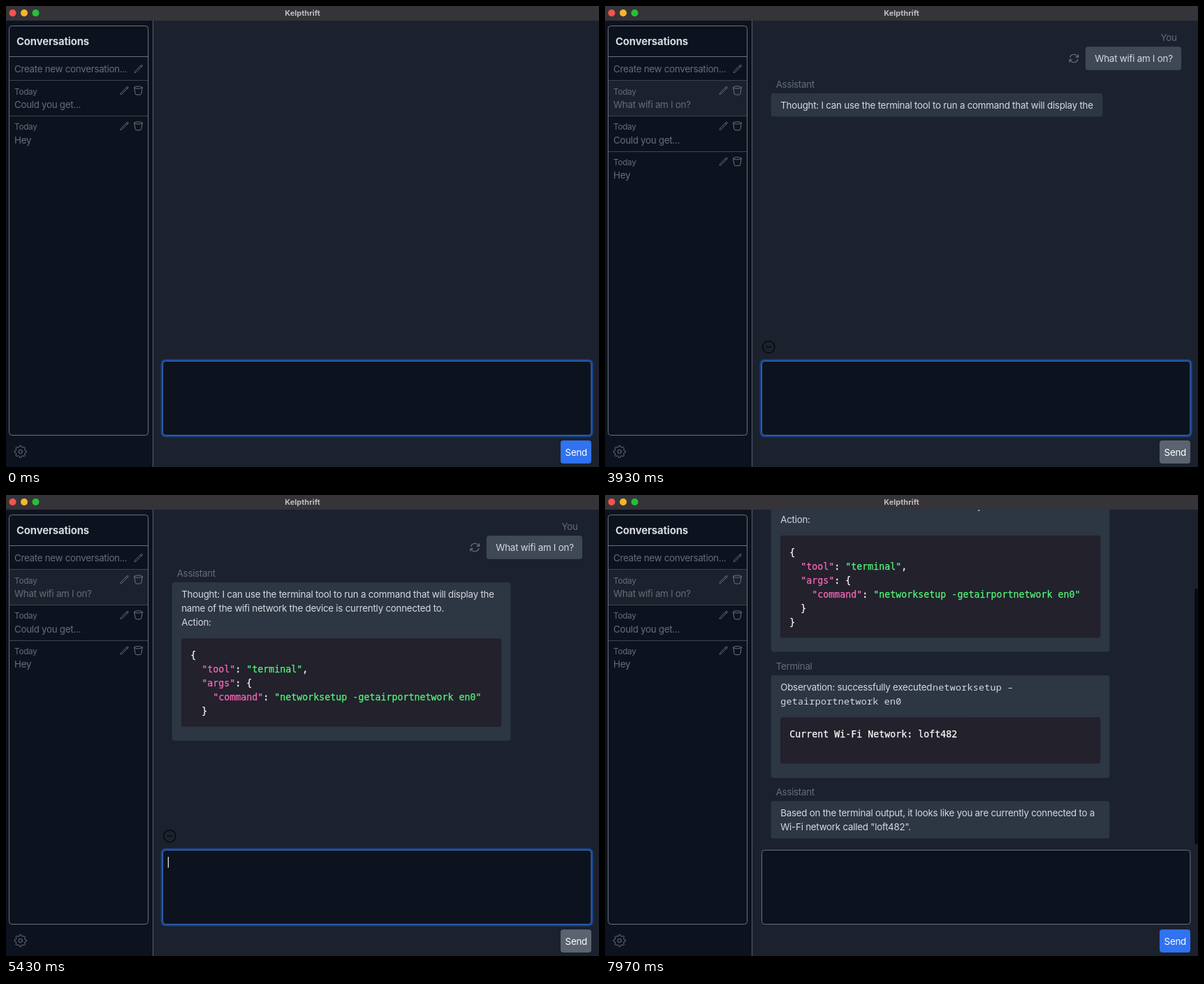
These frames come from a looping animation (849x660 px, 8 s). An HTML page:

```html
<!DOCTYPE html>
<html lang="en">
<head>
<meta charset="utf-8">
<title>Chat</title>
<style>
html, body { margin: 0; width: 100%; height: 100%; overflow: hidden; background: #1b222e; }
svg { display: block; width: 100vw; height: 100vh; }
text { font: 13.36px Inter, sans-serif; letter-spacing: -.245px; fill: #d5d9df; white-space: pre; }
.dim { fill: #666d79; letter-spacing: -.29px; }
.small { font-size: 11.7px; letter-spacing: -.25px; }
.head { font-size: 14.8px; font-weight: 700; letter-spacing: -.1px; }
.title { font-size: 11px; font-weight: 700; letter-spacing: 0; fill: #bebdc1; text-anchor: middle; }
.white { fill: #fff; }
.code { font-family: "DejaVu Sans Mono", monospace; font-size: 13.3px; letter-spacing: 0; fill: #f8f8f5; stroke: #f8f8f5; stroke-width: .25; }
.key { fill: #f766b9; stroke: #f766b9; }
.str { fill: #52f578; stroke: #52f578; }
.inline { font-family: "Noto Sans Mono", monospace; letter-spacing: .24px; }
.icon { fill: none; stroke: #6f7681; stroke-width: 1.6; stroke-linecap: round; stroke-linejoin: round; }
.thin { stroke-width: 1; }
</style>
</head>
<body>
<svg viewBox="0 0 849 660">
  <defs>
    <clipPath id="view"><rect x="211" y="21" width="638" height="479"/></clipPath>
    <g id="pencil" class="icon" transform="scale(.57) translate(-11.7 -12)">
      <path d="M16.86 4.49l1.69-1.69a1.875 1.875 0 1 1 2.65 2.65L6.83 19.82a4.5 4.5 0 0 1-1.9 1.13l-2.68.8.8-2.69a4.5 4.5 0 0 1 1.13-1.9zM16.86 4.49L19.5 7.12"/>
    </g>
    <g id="bin" class="icon thin">
      <ellipse cy="-4.4" rx="5.8" ry="1.6"/>
      <path d="M-5.8-4.4l1.3 8.2q.3 2.3 2.6 2.3h3.8q2.3 0 2.6-2.3l1.3-8.2"/>
    </g>
    <g id="reload" class="icon" transform="scale(.7) translate(-12 -12)">
      <path d="M16.02 9.35h5M2.98 19.64v-5h5M2.98 14.65l3.18 3.18a8.25 8.25 0 0 0 13.8-3.7M4.03 9.87a8.25 8.25 0 0 1 13.8-3.7l3.18 3.18v-5"/>
    </g>
    <path id="hand" fill="#fff" stroke="#111" stroke-width=".9" d="M-1.2 1a1.2 1.2 0 0 1 2.4 0v3.6l4.2.9q1.4.4 1.2 2l-.8 3.6q-.2 1.4-1.5 1.4h-4q-1 0-1.6-.9l-3-4.2q-.7-1 .1-1.6t1.9.3l1.1 1z"/>
    <path id="arrow" fill="#000" stroke="#fff" stroke-width=".8" d="M0 0v11l2.6-2.4 1.7 3.9 1.9-.8-1.7-3.8h3.6z"/>
  </defs>

  <rect width="849" height="660" fill="#1b222e"/>
  <rect y="21" width="210" height="639" fill="#0d131e"/>
  <path d="M210.5 21v639" stroke="#59606b"/>
  <g id="chat" clip-path="url(#view)"></g>
  <rect width="849" height="21" fill="#353439"/>
  <circle cx="9.5" cy="10" r="5" fill="#f3544d"/>
  <circle cx="26" cy="10" r="5" fill="#f5b62f"/>
  <circle cx="42.5" cy="10" r="5" fill="#25c03a"/>
  <text class="title" x="424.5" y="13.5">Kelpthrift</text>

  <g id="list"></g>
  <rect x="4.5" y="28.5" width="199" height="586" rx="4" fill="none" stroke="#69707c"/>
  <path d="M5 72.5h198" stroke="#69707c"/>
  <path d="M5 106.5h198" stroke="#3d4450"/>
  <text class="head" x="15" y="55.7">Conversations</text>
  <text class="dim" x="12" y="95.2">Create new conversation...</text>
  <use href="#pencil" transform="translate(189.5 90)"/>
  <g class="icon thin" transform="translate(20.7 638)"><path id="gear"/><circle r="2.7"/></g>

  <g id="form"></g>
</svg>
<script>
const LOOP = 8000, SEND = 3190, CLICK = 6880, BOTTOM = 491.7, LINE = 20.04, PITCH = 8.007;
const TRACK = -.245;                   // letter spacing of plain text
const QUESTION = 'What wifi am I on?';
const $ = id => document.getElementById(id);
const clamp = v => Math.max(0, Math.min(1, v));
const part = (t, a, b) => clamp((t - a) / (b - a));

const text = (x, y, s, cls = '') => `<text x="${x}" y="${y}" class="${cls}">${s}</text>`;
const box = (x, y, w, h, fill, r = 3.5, more = '') =>
  `<rect x="${x}" y="${y}" width="${w}" height="${h}" rx="${r}" fill="${fill}" ${more}/>`;
const icon = (id, x, y) => `<g transform="translate(${x} ${y})"><use href="#${id}"/></g>`;
const bubble = (y, w, h) => box(237.7, y, w, h, '#2d3643');
const codeBox = (y, lines) => box(251, y, 458.3, 26.3 + lines * LINE, '#22212c');

const pen = document.createElement('canvas').getContext('2d');
function width(s) {
  pen.font = '13.36px Inter, sans-serif';
  return pen.measureText(s).width + TRACK * s.length;
}

// Shows whole words of s between two times.
function words(s, t, a, b) {
  const all = s.match(/\s*\S+/g);
  return t < a ? '' : all.slice(0, 1 + Math.floor(part(t, a, b) * (all.length - 1))).join('');
}

const thought = [
  ['Thought: I can use the terminal tool to run a command that will display the', 3490, 3900],
  ['name of the wifi network the device is currently connected to.', 3950, 4420],
  ['Action:', 4450, 4480]
];
const reply = [
  ['Based on the terminal output, it looks like you are currently connected to a', 7260, 7665],
  ['Wi-Fi network called "loft482".', 7700, 7880]
];
// Each line: indent, start, end, then class and text pairs.
const json = [
  [0, 4560, 4570, '', '{'],
  [2, 4640, 4830, 'key', '"tool"', '', ': ', 'str', '"terminal"', '', ','],
  [2, 4840, 4905, 'key', '"args"', '', ': {'],
  [4, 4910, 4960, 'key', '"command"', '', ':'],
  [4, 4990, 5380, 'str', '"networksetup -getairportnetwork en0"'],
  [2, 5420, 5430, '', '}'],
  [0, 5470, 5480, '', '}']
];

function codeLines(t, top) {
  let out = '', row = -1;
  json.forEach(([indent, a, b, ...runs], i) => {
    if (t < a) return;
    const more = i === 4;              // continues the line above
    if (!more) row++;
    const all = runs.filter((_, k) => k % 2).join('').length;
    let left = Math.ceil(part(t, a, b) * (all - 1)) + 1, spans = '';
    for (let k = 0; k < runs.length; k += 2) {
      const s = runs[k + 1].slice(0, Math.max(0, left));
      left -= runs[k + 1].length;
      spans += `<tspan class="${runs[k]}">${s}</tspan>`;
    }
    const col = indent + (more ? 11 : 0);
    out += text(264.2 + col * PITCH, top + 28.5 + row * LINE, spans, 'code');
  });
  return { out, rows: row + 1 };
}

// Streams lines of prose into a bubble that grows with them.
function prose(lines, t, top) {
  const shown = lines.map(l => words(l[0], t, l[1], l[2])).filter(Boolean);
  return {
    out: shown.map((s, i) => text(251.2, top + 22 + i * LINE, s)).join(''),
    w: shown.length > 1 ? 484.7 : Math.min(484.7, width(shown[0]) + 27.2),
    h: 13.3 + shown.length * LINE
  };
}

function chat(t) {
  if (t < SEND) return '';
  let out = text(795.5, 50, 'You', 'dim') + box(688, 58.3, 137, 33.4, '#3f4855')
    + text(701.3, 80.2, QUESTION) + icon('reload', 671.3, 75);
  let end = 0;
  if (t >= 3490) {
    const p = prose(thought, t, 125), top = 205.2, c = codeLines(t, top);
    const h = c.rows ? top - 125 + 26.3 + c.rows * LINE + 20 : p.h;
    out += text(244.7, 117, 'Assistant', 'dim') + bubble(125, p.w, h) + p.out
      + (c.rows ? codeBox(top, c.rows) + c.out : '');
    end = 125 + h;
  }
  if (t >= 6980) {
    out += text(244.7, 397.2, 'Terminal', 'dim') + bubble(405.5, 484.7, 146.6)
      + text(251.2, 427.4, 'Observation: successfully executed')
      + text(468.9, 427.4, 'networksetup –', 'inline')
      + text(251.2, 447.5, 'getairportnetwork en0', 'inline')
      + codeBox(465.4, 2) + text(264.2, 493.9, 'Current Wi-Fi Network: loft482', 'code');
    end = 552.1;
  }
  if (t >= 7260) {
    const p = prose(reply, t, 585.5);
    out += text(244.7, 577.3, 'Assistant', 'dim') + bubble(585.5, p.w, p.h) + p.out;
    end = 585.5 + p.h;
  }
  const scroll = Math.max(0, end - BOTTOM), bar = 479 * 479 / (479 + scroll);
  return `<g transform="translate(0 ${-scroll})">${out}</g>`
    + (scroll ? box(844.3, 500.5 - bar, 4.4, bar, '#06090f', 2) : '');
}

function list(t) {
  const sent = t >= SEND;
  const items = [...(sent ? [QUESTION] : []), 'Could you get...', 'Hey'];
  return items.map((s, i) => {
    const y = i * 50.8;
    return (sent && !i ? box(5, 107, 198, 50.5, '#1b222d', 0) : '')
      + (i ? `<path d="M5 ${Math.floor(106.8 + y)}.5h198" stroke="#3d4450"/>` : '')
      + text(12, 126.6 + y, 'Today', 'dim small') + text(12, 145.8 + y, s, 'dim')
      + icon('pencil', 169.4, 121 + y) + icon('bin', 189.4, 121 + y);
  }).join('');
}

function typed(t) {
  if (t >= SEND) return '';
  const n = t < 1000 ? 0 : t < 1470 ? 1 + Math.floor(part(t, 1000, 1330) * 4)
    : t < 2310 ? 6 + Math.floor(part(t, 1470, 2230) * 7) : 14 + Math.floor(part(t, 2310, 2900) * 4);
  return QUESTION.slice(0, n);
}

function caretOn(t) {
  if (t >= CLICK) return false;
  if (t < 1000) return t >= 430 && t < 930;
  return t < SEND || (t - SEND) % 1000 < 510;
}

function pointer(t) {
  if (t < 5720 || t >= CLICK) return '';
  const k = part(t, 5720, 6450), e = k * k * (3 - 2 * k);
  const x = 829 - 351 * e, y = 330 + 164 * e;
  return icon(x < 517 && y > 478 ? 'hand' : 'arrow', x, y);
}

function form(t) {
  const focus = t < CLICK, busy = t >= SEND && t < 7930, s = typed(t);
  let out = (focus ? box(223.2, 507.2, 616, 108.6, 'none', 5, 'stroke="#18448f" stroke-width="3"') : '')
    + box(224.5, 508.5, 613.4, 106, '#0d131e', 4, `stroke="${focus ? '#3f72bf' : '#69707c'}"`)
    + text(232, 531, s, 'white');
  if (caretOn(t)) out += box(231.8 + width(s), 518, 1.1, 15.5, '#fff', 0);
  out += box(794, 622, 44, 33, busy ? '#5a636f' : '#3072f0', 4) + text(800.6, 643.6, 'Send', 'white');
  if (busy) out += '<g fill="none" stroke="#05070b" stroke-width="1.4"><circle cx="234.3" cy="488.3" r="8.6"/><path d="M230.4 488.3h7.8"/></g>';
  if (t >= 5560 && t < CLICK) {
    out += box(251, 478.4, 266.5, 20.2, '#5aab7c', 10.1)
      + `<text x="257.8" y="493.3" style="fill:#111a22">Click to approve: "run terminal command"</text>`;
  }
  return out + pointer(t);
}

const teeth = Array.from({ length: 32 }, (_, i) => {
  const a = (i - 1.5) * Math.PI / 16 - Math.PI / 2, r = i % 4 === 1 || i % 4 === 2 ? 8.6 : 6.7;
  return `${(r * Math.cos(a)).toFixed(2)} ${(r * Math.sin(a)).toFixed(2)}`;
});
$('gear').setAttribute('d', `M${teeth.join('L')}z`);

const last = {};
function update(id, html) {
  if (last[id] !== html) $(id).innerHTML = last[id] = html;
}
function draw() {
  const t = performance.now() % LOOP;
  update('chat', chat(t));
  update('list', list(t));
  update('form', form(t));
  requestAnimationFrame(draw);
}
draw();
</script>
</body>
</html>
```
